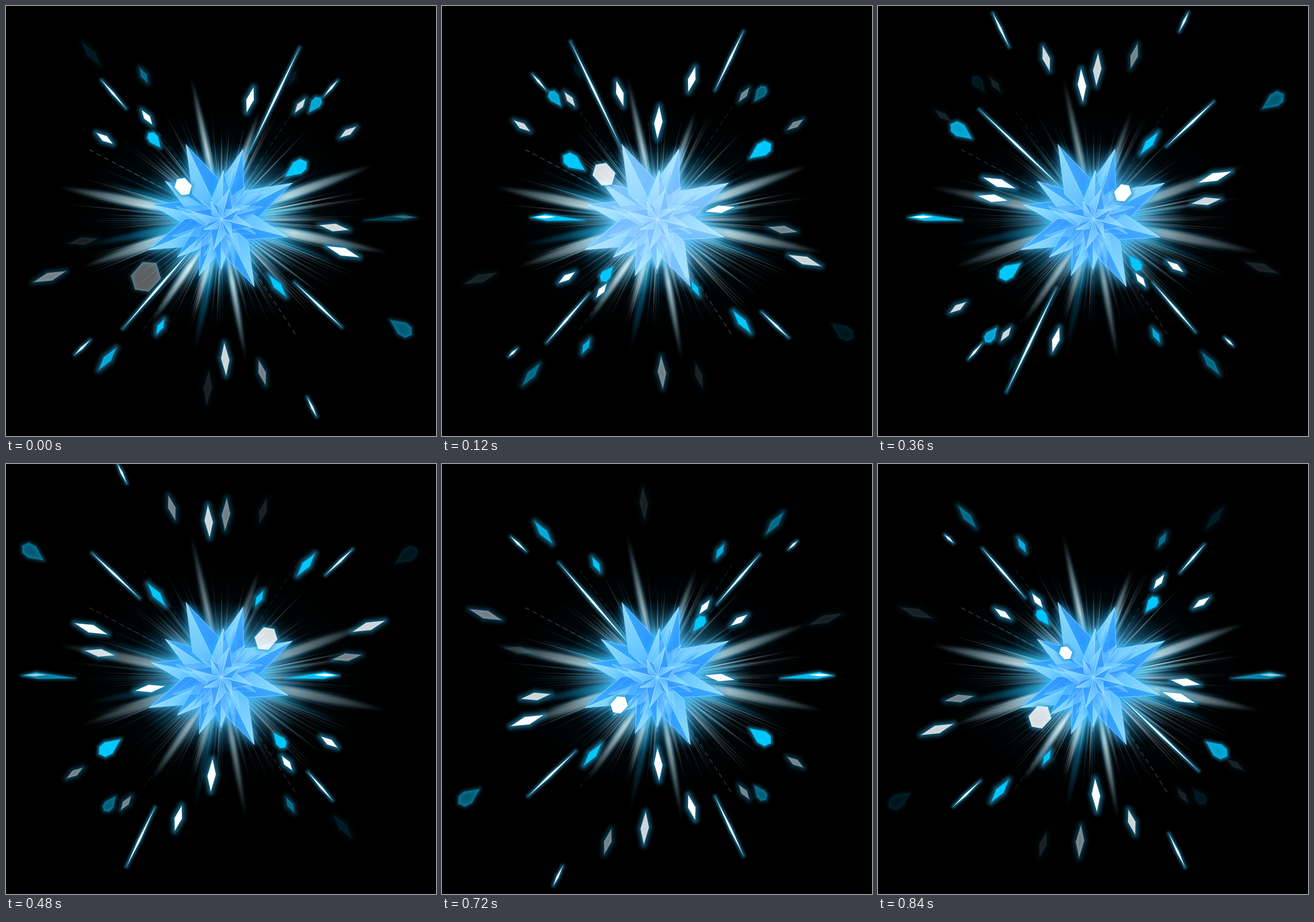
These frames come from a looping animation (748x748 px, 960 ms). An HTML page with a canvas:

```html
<!DOCTYPE html>
<html lang="en">
<head>
<meta charset="utf-8">
<title>Ice burst</title>
<style>
html, body { margin: 0; width: 100%; height: 100%; overflow: hidden; background: #000; }
canvas { display: block; width: 100vmin; height: 100vmin; }
</style>
</head>
<body>
<canvas id="stage" width="748" height="748"></canvas>
<script>
const SIZE = 748, STEP = 120, STEPS = 8, TURN = Math.PI * 2;
const CORE_X = 375, CORE_Y = 371;
const WHITE = '255,255,255', CYAN = '0,200,255', GREY = '190,208,214', TEAL = '10,125,175';
const ctx = document.getElementById('stage').getContext('2d');

let seed = 41;
const random = (low = 0, high = 1) =>
  low + (high - low) * (seed = seed * 16807 % 2147483647) / 2147483647;

// A still picture whose origin is the core of the burst.
function layer(paint) {
  const canvas = document.createElement('canvas');
  canvas.width = canvas.height = SIZE;
  const g = canvas.getContext('2d');
  g.translate(CORE_X, CORE_Y);
  paint(g);
  return canvas;
}

function polygon(g, points) {
  g.beginPath();
  points.forEach(([x, y]) => g.lineTo(x, y));
  g.closePath();
}

function oval(g, radius, stretch, stops) {
  g.save();
  g.scale(stretch, 1);
  const fill = g.createRadialGradient(0, 0, 0, 0, 0, radius);
  stops.forEach(([at, colour]) => fill.addColorStop(at, colour));
  g.fillStyle = fill;
  g.fillRect(-radius, -radius, radius * 2, radius * 2);
  g.restore();
}

function ray(g, angle, length, width, alpha, colour) {
  const start = 50;
  g.save();
  g.rotate(angle);
  const fill = g.createLinearGradient(start, 0, length, 0);
  [[0, 0.5], [0.3, 1], [0.6, 0.55], [1, 0]].forEach(([at, a]) =>
    fill.addColorStop(at, `rgba(${colour},${alpha * a})`));
  g.fillStyle = fill;
  g.beginPath();
  g.moveTo(start, 0);
  g.quadraticCurveTo(length * 0.45, -width, length, 0);
  g.quadraticCurveTo(length * 0.45, width, start, 0);
  g.fill();
  g.restore();
}

const BEAM_TIPS = [
  [88, 314], [642, 276], [668, 430], [130, 455], [321, 117],
  [418, 622], [250, 555], [442, 180], [325, 545]
];
const BAND_TIPS = [[590, 452], [135, 417], [560, 345], [327, 606], [160, 303]];
const DASH_TIPS = [[506, 174], [145, 250], [240, 185], [505, 574], [238, 565]];

const fromCore = ([x, y]) => {
  const dx = x - CORE_X, dy = y - CORE_Y;
  return { angle: Math.atan2(dy, dx), length: Math.hypot(dx, dy) };
};

const rays = layer(g => {
  g.globalCompositeOperation = 'screen';
  oval(g, 205, 1.3, [[0, 'rgba(0,70,105,.5)'], [0.5, 'rgba(0,40,58,.28)'], [1, 'rgba(0,15,22,0)']]);
  for (let i = 0; i < 230; i++) {
    const angle = random(0, TURN);
    const length = (205 + 75 * Math.cos(angle) ** 2) * random(0.6, 1.03);
    ray(g, angle, length, random(1, 3.5), random(0.12, 0.5), random() < 0.25 ? TEAL : GREY);
  }
  g.filter = 'blur(2px)';
  BAND_TIPS.map(fromCore).forEach(b => ray(g, b.angle, b.length, 13, 0.7, TEAL));
  BEAM_TIPS.map(fromCore).forEach(b => {
    const width = 7 + 8 * Math.abs(Math.cos(b.angle));
    ray(g, b.angle, b.length, width * 1.7, 0.4, TEAL);
    ray(g, b.angle, b.length, width, 0.85, '215,230,232');
  });
  g.filter = 'none';
  g.setLineDash([9, 6]);
  DASH_TIPS.map(fromCore).forEach(({ angle, length }, i) => {
    g.save();
    g.rotate(angle);
    g.strokeStyle = `rgba(${i % 2 ? GREY : TEAL},.4)`;
    g.beginPath();
    g.moveTo(length * 0.45, 0);
    g.lineTo(length, 0);
    g.stroke();
    g.restore();
  });
});

const halo = layer(g => oval(g, 135, 1.22, [
  [0, 'rgb(40,150,255)'], [0.45, 'rgba(75,185,255,.85)'],
  [0.65, 'rgba(60,170,225,.45)'], [1, 'rgba(0,90,130,0)']
]));

const SHARD_TIPS = [
  [253, 346], [249, 424], [277, 305], [298, 437], [336, 469], [313, 241],
  [412, 249], [498, 308], [490, 402], [432, 488], [374, 458], [378, 286]
];

// A kite of two facets, pale on one side and blue on the other.
function shard(g, angle, length, alpha) {
  const bend = length * 0.42, half = length * 0.15 + 5;
  g.save();
  g.rotate(angle);
  g.globalAlpha = alpha;
  [[half, '#45a8ff', '#1f86ff'], [-half, '#a2e8ff', '#4fb2ff']].forEach(([side, outer, inner]) => {
    const fill = g.createLinearGradient(length, 0, 0, 0);
    fill.addColorStop(0, outer);
    fill.addColorStop(1, inner);
    g.fillStyle = fill;
    polygon(g, [[length, 0], [bend, side], [0, 0]]);
    g.fill();
    g.strokeStyle = 'rgba(180,240,255,.6)';
    g.stroke();
  });
  g.restore();
}

const crystal = layer(g => {
  g.lineJoin = 'round';
  g.shadowColor = '#2fb4ff';
  g.shadowBlur = 14;
  SHARD_TIPS.map(fromCore).forEach(s => shard(g, s.angle, s.length, 0.92));
  g.shadowBlur = 0;
  for (let i = 0; i < 26; i++) shard(g, random(0, TURN), random(45, 100), random(0.2, 0.5));
  for (let i = 0; i < 8; i++) shard(g, i * TURN / 8 + 0.25, i % 2 ? 36 : 55, 0.8);
});

const whiteCrystal = layer(g => {
  g.drawImage(crystal, -CORE_X, -CORE_Y);
  g.globalCompositeOperation = 'source-in';
  g.fillStyle = '#e8f8ff';
  g.fillRect(-SIZE, -SIZE, SIZE * 2, SIZE * 2);
});

// Every particle family is drawn for the upper right and mirrored: [flip x, flip y, shift y].
const UPPER_RIGHT = [1, 1, 0], UPPER_LEFT = [-1, 1, -11];
const LOWER_LEFT = [-1, -1, 0], LOWER_RIGHT = [1, -1, -19];
const LEVEL_LEFT = [-1, 1, -4], LEVEL_RIGHT = [1, 1, -4];
const around = birth => [
  [UPPER_RIGHT, birth], [UPPER_LEFT, birth + 1], [LOWER_LEFT, birth + 3], [LOWER_RIGHT, birth + 5]
];

// Outlines in units of length and width, pointing outwards along x.
const DIAMOND = [[0.5, 0], [0.03, 0.5], [-0.5, 0], [-0.03, -0.5]];
const DROP = [[-0.55, 0.05], [0.02, -0.5], [0.34, -0.45], [0.5, 0], [0.33, 0.42], [0.05, 0.5]];
const CHUNK = [[-0.5, 0.15], [-0.32, -0.4], [0.22, -0.5], [0.5, -0.12], [0.34, 0.38], [-0.2, 0.5]];
const SLIVER = [[0.5, 0], [0.23, -0.5], [-0.5, 0.4], [0.2, 0.45]];
const STREAK = [[0, 0], [-0.45, 0.5], [-1, 0], [-0.45, -0.5]];

const easeOut = (age, gap) => 1 - gap * (1 - age / 4) ** 2;
const fade = age => Math.min(1, 1.5 - 0.35 * age);

function drawShape(outline, x, y, reach, length, width, colour, alpha, glow = 1) {
  ctx.translate(x * reach, y * reach);
  ctx.rotate(Math.atan2(y, x));
  polygon(ctx, outline.map(([u, v]) => [u * length, v * width]));
  ctx.globalAlpha = alpha;
  ctx.lineJoin = 'round';
  [20, 14, 9, 4].forEach((size, i) => {
    ctx.lineWidth = size * glow;
    ctx.strokeStyle = `rgba(35,150,195,${0.1 + 0.07 * i})`;
    ctx.stroke();
  });
  ctx.fillStyle = `rgb(${colour})`;
  ctx.fill();
}

const diamond = (x, y, gap, birth, length, colour = WHITE) => ({
  births: around(birth), ages: 5,
  draw: age => drawShape(DIAMOND, x, y, easeOut(age, gap), length, 6 + length * 0.15, colour, fade(age))
});

// A drop hangs back until it leaps outwards.
const drop = (x, y, birth, length, leap) => ({
  births: around(birth), ages: 5,
  draw: age => drawShape(DROP, x, y, easeOut(age, 0.45) * (age < leap ? 0.76 : 1),
    length, length * 0.55, CYAN, fade(age), 0.7)
});

const streak = (x, y, gap, birth, ages) => ({
  births: around(birth), ages,
  draw: age => drawShape(STREAK, x, y, easeOut(age, gap), 200 * 0.57 ** age, 4, '235,252,255', 1, 0.6)
});

function drawChunk(age) {
  const length = 25 * 1.32 ** age;
  drawShape(CHUNK, 135, -108, 0.3 * 1.45 ** age, length, length * 0.82, WHITE, Math.min(1, 1.8 - 0.48 * age), 0.7);
}

function drawSliver(age) {
  const alpha = Math.min(1, fade(age) + 0.15);
  drawShape(SLIVER, 302, 0, easeOut(age, 0.45), 92, 12, CYAN, alpha, 0.6);
  polygon(ctx, DIAMOND.map(([u, v]) => [22 + u * 38, v * 5 - 1]));
  ctx.fillStyle = '#fff';
  ctx.fill();
}

const STREAKS = [
  streak(175, -365, 0.18, 0, 4), streak(251, -238, 0.24, 2, 5), streak(213, -246, 0.23, 5, 4)
];
const PARTICLES = [
  diamond(163, -224, 0.45, 6, 31), diamond(254, -170, 0.41, 6, 34),
  diamond(300, -102, 0.48, 2, 60), diamond(233, -37, 0.5, 1, 52),
  diamond(16, -292, 0.42, 1, 57), diamond(80, -290, 0.28, 0, 45),
  diamond(131, -247, 0.44, 4, 29, CYAN), diamond(219, -278, 0.52, 3, 49, CYAN),
  drop(192, -226, 6, 31, 2), drop(330, -213, 0, 43, 3),
  { births: [[UPPER_RIGHT, 2], [UPPER_LEFT, 7], [LOWER_LEFT, 5]], ages: 4, draw: drawChunk },
  { births: [[LEVEL_LEFT, 1], [LEVEL_RIGHT, 4]], ages: 5, draw: drawSliver }
];

function drawFamily({ births, ages, draw }, step) {
  births.forEach(([[flipX, flipY, shift], birth]) => {
    const age = (step - birth + 2 * STEPS) % STEPS;
    if (age >= ages) return;
    ctx.save();
    ctx.setTransform(flipX, 0, 0, flipY, 367, 372 + shift);
    draw(age);
    ctx.restore();
  });
}

function drawLayer(picture, alpha, blend = 'source-over') {
  ctx.globalAlpha = alpha;
  ctx.globalCompositeOperation = blend;
  ctx.drawImage(picture, 0, 0);
  ctx.globalAlpha = 1;
  ctx.globalCompositeOperation = 'source-over';
}

function render(step) {
  const rayLight = 0.83 + 0.17 * Math.cos(step / STEPS * TURN);
  const flash = 0.4 * 0.4 ** ((step + STEPS - 1) % STEPS);
  ctx.fillStyle = '#000';
  ctx.fillRect(0, 0, SIZE, SIZE);
  drawLayer(halo, 1);
  drawLayer(rays, rayLight, 'screen');
  STREAKS.forEach(family => drawFamily(family, step));
  drawLayer(crystal, 1);
  drawLayer(whiteCrystal, flash);
  PARTICLES.forEach(family => drawFamily(family, step));
}

let shown = -1;
const start = performance.now();
function tick() {
  const step = Math.floor((performance.now() - start) / STEP) % STEPS;
  if (step !== shown) render(shown = step);
  requestAnimationFrame(tick);
}
tick();
</script>
</body>
</html>
```
